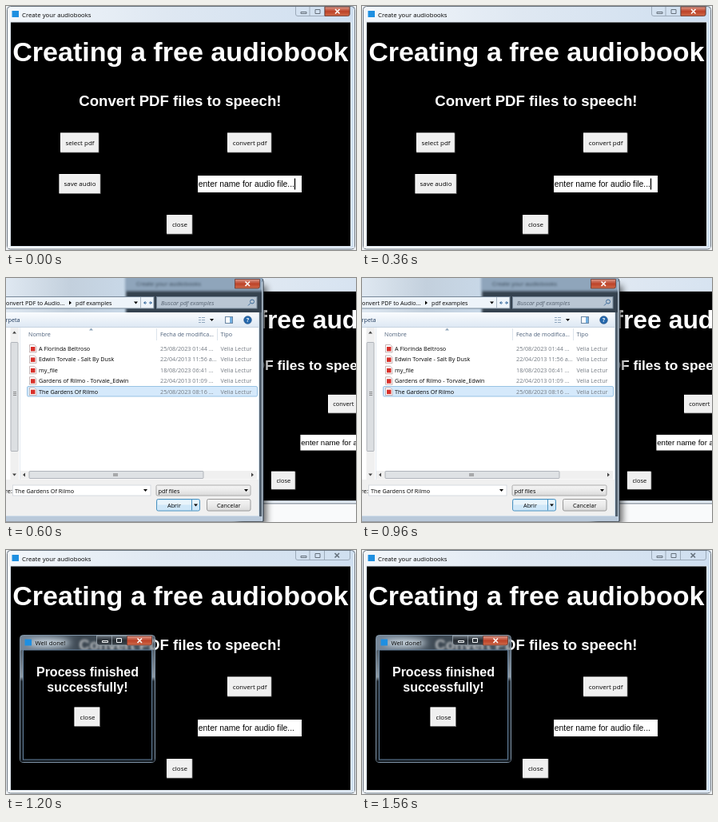
These frames come from a looping animation (438x305 px, 1800 ms). An HTML page:

```html
<!DOCTYPE html>
<html lang="en">
<head>
<meta charset="utf-8">
<title>Audiobook maker</title>
<style>
html, body { margin: 0; width: 100%; height: 100%; overflow: hidden; background: #fff; }
svg { display: block; width: 438px; height: 305px; }
text { white-space: pre; }
.ui { font: 7.75px "Open Sans", "Noto Sans", sans-serif; }
.btn { font: 8px "Open Sans", "Noto Sans", sans-serif; text-anchor: middle; }
.dlg { font: 7.25px "Open Sans", "Noto Sans", sans-serif; }
.big { font-family: "Liberation Sans", Arial, sans-serif; font-weight: 700; fill: #fff; }
.field { font: 10.35px "Liberation Sans", Arial, sans-serif; }
.mid { text-anchor: middle; }
.grey { fill: #747b83; }
.head { fill: #4c607a; }
.scene { animation: show 1800ms step-end infinite; }
.pick { animation-delay: -1200ms; }
.done { animation-delay: -600ms; }
@keyframes show {
  0% { visibility: visible; }
  33.3333%, 100% { visibility: hidden; }
}
</style>
</head>
<body>
<svg viewBox="0 0 438 305">
  <defs>
    <linearGradient id="bar">
      <stop offset="0" stop-color="#f3f7fb"/>
      <stop offset=".45" stop-color="#dfe8f2"/>
      <stop offset="1" stop-color="#cfdff0"/>
    </linearGradient>
    <linearGradient id="tool" x2="0" y2="1">
      <stop offset="0" stop-color="#fafcfe"/>
      <stop offset="1" stop-color="#dce7f3"/>
    </linearGradient>
    <linearGradient id="face" x2="0" y2="1">
      <stop offset="0" stop-color="#f4f4f4"/>
      <stop offset=".5" stop-color="#ebebeb"/>
      <stop offset="1" stop-color="#d9d9d9"/>
    </linearGradient>
    <linearGradient id="red" x2="0" y2="1">
      <stop offset="0" stop-color="#dc9a8c"/>
      <stop offset=".5" stop-color="#bd4329"/>
      <stop offset="1" stop-color="#cf6a49"/>
    </linearGradient>
    <linearGradient id="dark" x2="0" y2="1">
      <stop offset="0" stop-color="#6d7780"/>
      <stop offset=".5" stop-color="#272d33"/>
      <stop offset="1" stop-color="#3d454d"/>
    </linearGradient>
    <linearGradient id="smoke">
      <stop offset="0" stop-color="#77889a"/>
      <stop offset=".45" stop-color="#3b4650"/>
      <stop offset="1" stop-color="#4a5661"/>
    </linearGradient>
    <linearGradient id="edge" x2="0" y2="1">
      <stop offset="0" stop-color="#55616d"/>
      <stop offset=".24" stop-color="#8e9aa5"/>
      <stop offset=".28" stop-color="#20282f"/>
      <stop offset="1" stop-color="#141a20"/>
    </linearGradient>
    <linearGradient id="sheen">
      <stop offset="0" stop-color="#dfe8f1"/>
      <stop offset=".25" stop-color="#c3d0dd"/>
      <stop offset=".5" stop-color="#c9d9e9"/>
    </linearGradient>
    <filter id="soft" x="-30%" y="-60%" width="160%" height="220%"><feGaussianBlur stdDeviation="1.5"/></filter>
    <filter id="haze" x="-30%" y="-90%" width="160%" height="280%"><feGaussianBlur stdDeviation="4"/></filter>
    <clipPath id="popBar"><rect x="18" y="107" width="169" height="18"/></clipPath>
    <clipPath id="glass"><rect width="321" height="43"/></clipPath>
    <clipPath id="list"><rect x="18" y="62" width="298" height="178"/></clipPath>

    <text id="tagline" class="big" x="91.3" y="125.2" font-size="18.6">Convert PDF files to speech!</text>

    <path id="cross" d="M0 0l5.500 5.500m0-5.500l-5.500 5.500" fill="none" stroke-width="1.600"/>
    <g id="glyphs" fill="none">
      <path d="M7.500 7.500h7v2h-7z"/>
      <path d="M25.500 4.500h6v5h-6z"/>
      <use href="#cross" x="50" y="4"/>
    </g>
    <g id="hot">
      <path d="M.5 0h31v9q0 2.500-2.500 2.500h-28.500z" fill="url(#red)" stroke="#6b3a32" stroke-width=".8"/>
      <use href="#cross" x="13.500" y="3" stroke="#fff"/>
    </g>

    <g id="close">
      <rect width="32.5" height="24.5" fill="#696969"/>
      <rect width="31.5" height="23.5" fill="#fff"/>
      <rect x="1" y="1" width="30.5" height="22.5" fill="#f0f0f0"/>
      <text class="btn" x="16.5" y="15.2">close</text>
    </g>

    <g id="app">
      <rect x="1.5" y=".5" width="435" height="303.5" rx="4" fill="url(#bar)" stroke="#69747f"/>
      <path d="M2.5 4V302.5H435.5V4" fill="none" stroke="#f8fbfd" opacity=".8"/>
      <rect x="5" y="19.5" width="427" height="281.5" fill="#e3ebf3"/>
      <rect x="6" y="20.5" width="425" height="279.5"/>
      <rect x="7.5" y="6" width="8.5" height="8" fill="#1e8fe1"/>
      <text class="ui" x="20" y="13.5">Create your audiobooks</text>
      <path d="M362.5 1v9q0 2.500 2.500 2.500h63q2.500 0 2.500-2.500v-9M380 1v11.500M398.500 1v11.500" fill="none" stroke="#9caab9"/>
      <use href="#glyphs" x="361.500" stroke="#66717c"/>
      <text class="big mid" x="218.4" y="69.4" font-size="34.1">Creating a free audiobook</text>
      <use href="#tagline"/>
      <rect x="277" y="158.5" width="55.5" height="25" fill="#696969"/>
      <rect x="277" y="158.5" width="54.5" height="24" fill="#fff"/>
      <rect x="278" y="159.5" width="53.5" height="23" fill="#f0f0f0"/>
      <text class="btn" x="305" y="173.5">convert pdf</text>
      <rect x="240" y="212" width="130" height="21" fill="#fff"/>
      <text class="field" x="240.8" y="226">enter name for audio file...</text>
      <use href="#close" x="201" y="261"/>
    </g>

    <g id="side">
      <rect x="68" y="158.5" width="48.5" height="25" fill="#696969"/>
      <rect x="68" y="158.5" width="47.5" height="24" fill="#fff"/>
      <rect x="69" y="159.5" width="46.5" height="23" fill="#f0f0f0"/>
      <text class="btn" x="92.5" y="173.5">select pdf</text>
      <rect x="66.5" y="210" width="52" height="25" fill="#696969"/>
      <rect x="66.5" y="210" width="51" height="24" fill="#fff"/>
      <rect x="67.5" y="211" width="50" height="23" fill="#f0f0f0"/>
      <text class="btn" x="92.5" y="225">save audio</text>
    </g>

    <g id="doc">
      <path d="M.5.5h6l2.500 2.500v7h-8.500z" fill="#fff" stroke="#b9a3a3" stroke-width=".8"/>
      <rect x="2" y="3" width="5.5" height="5.5" fill="#d8302a"/>
    </g>
    <path id="down" d="M0 0h5l-2.500 3z"/>
  </defs>

  <rect width="438" height="305" fill="#f1f4f7"/>
  <path d="M225 .5h30" stroke="#555"/>

  <g class="scene">
    <use href="#app"/>
    <use href="#side"/>
    <use href="#hot" x="398.500" y="1"/>
    <path d="M361.500 215.500v14" stroke="#000" stroke-width="1.300"/>
  </g>

  <g class="scene pick">
    <rect width="438" height="305" fill="#f9fafb"/>
    <use href="#app" transform="translate(144 -2.300) scale(.935)"/>

    <!-- file dialog -->
    <rect x="290" y="10" width="36" height="300" opacity=".6" filter="url(#haze)"/>
    <path d="M-5 0H318q4 0 4 4V304H-5z" fill="#b9cbdd" stroke="#37434f"/>
    <g clip-path="url(#glass)">
      <rect width="322" height="43" fill="url(#sheen)"/>
      <g filter="url(#soft)">
        <rect x="149" y="-4" width="190" height="21" fill="#8fa5bb"/>
        <rect x="150" y="16" width="190" height="40" fill="#35424f"/>
        <text class="dlg" x="163" y="10" fill="#263645">Create your audiobooks</text>
      </g>
    </g>
    <path d="M317 43h4.500v260h-4.500z" fill="#53616f"/>
    <path d="M0 298h321v6h-321z" fill="#b9c9da"/>
    <path d="M316.500 43V297.500H0M320.500 5V303" fill="none" stroke="#d6e2ee" stroke-width=".8"/>
    <use href="#hot" x="286" y="1.500"/>

    <g class="dlg">
      <rect x="-2" y="23.5" width="187" height="14.5" fill="#eef4fa" stroke="#778899"/>
      <text x="0" y="33.5">onvert PDF to Audio...</text>
      <path d="M79 28.500l3 2.500l-3 2.500z"/>
      <text x="87" y="33.5">pdf examples</text>
      <path d="M168.500 24v14" stroke="#a8b5c2"/>
      <use href="#down" x="160" y="29.500"/>
      <path d="M173 31h3m-1.500-1.500l-2 1.500l2 1.500M182 31h-3m1.500-1.500l2 1.500l-2 1.500" fill="none" stroke="#245c94"/>
      <rect x="188.5" y="23.5" width="125.5" height="14.5" fill="#b9c6d3" stroke="#778899"/>
      <text x="194" y="33.5" font-style="italic" fill="#566371">Buscar pdf examples</text>
      <g fill="none" stroke="#3f6c9a"><circle cx="308" cy="29.500" r="2.500"/><path d="M306 31.500l-3 3"/></g>

      <rect y="43" width="316" height="19" fill="url(#tool)"/>
      <path d="M0 61.500h316" stroke="#c6d3e0"/>
      <text x="-.5" y="54.5" fill="#1e395b">rpeta</text>
      <path d="M241 49.500h3m1 0h4M241 52.500h3m1 0h4M241 55.500h3m1 0h4" stroke="#8fa6bd"/>
      <use href="#down" x="255" y="51"/>
      <rect x="274.5" y="48.5" width="9" height="8" fill="#fff" stroke="#6a86a3"/>
      <path d="M280 49h3v7h-3z" fill="#72aee0"/>
      <circle cx="302.500" cy="52.500" r="4.800" fill="#2468ad" stroke="#174579" stroke-width=".6"/>
      <text class="mid" x="302.5" y="55.3" fill="#fff" font-weight="700">?</text>

      <rect y="62" width="316" height="190" fill="#fff"/>
      <rect x="5.5" y="62" width="10.5" height="190" fill="#f0f0f0"/>
      <rect x="6" y="80.5" width="9" height="136" rx="1" fill="#dcdfe2" stroke="#a2a8af" stroke-width=".8"/>
      <path d="M9 142.500h4m-4 2h4m-4 2h4" stroke="#777" stroke-width=".8"/>
      <path d="M8 69.500h5l-2.500-3z" fill="#444"/>
      <use href="#down" x="8" y="244.500" fill="#444"/>
      <path d="M17.500 62v190" stroke="#e3eaf1"/>
      <path d="M188.500 63v15M264.500 63v15" stroke="#dce4ec"/>
      <path d="M104 65.500h5l-2.500-3z" fill="#8fa5ba"/>
      <g class="head">
        <text x="28" y="72.8">Nombre</text>
        <text x="193" y="72.8">Fecha de modifica...</text>
        <text x="268.5" y="72.8">Tipo</text>
      </g>
      <g clip-path="url(#list)">
        <rect x="26.5" y="135.5" width="288" height="12.5" rx="1.5" fill="#d5e9fb" stroke="#84b6df" stroke-width=".8"/>
        <g id="rows"></g>
      </g>
      <rect x="18" y="241" width="296" height="10.5" fill="#f0f0f0"/>
      <rect x="29" y="241.5" width="218" height="9" rx="1" fill="#dfe2e5" stroke="#a2a8af" stroke-width=".8"/>
      <path d="M135 244v4m2-4v4m2-4v4" stroke="#555" stroke-width=".8"/>
      <path d="M24 243.500v5l-3-2.500zM307 243.500v5l3-2.500z" fill="#444"/>

      <rect y="252" width="316" height="45" fill="#f0f0f0"/>
      <text x="-1" y="268.5">re:</text>
      <rect x="8.5" y="259" width="172.5" height="13" fill="#fff" stroke="#d3d8dd" stroke-width=".9"/>
      <text x="11" y="268.5">The Gardens Of Rilmo</text>
      <use href="#down" x="172" y="264"/>
      <rect x="188" y="259" width="118" height="13" rx="1.5" fill="url(#face)" stroke="#a3a3a3" stroke-width=".9"/>
      <text x="190.5" y="268.5">pdf files</text>
      <use href="#down" x="298" y="264"/>
      <rect x="188.5" y="276.5" width="54" height="14.5" rx="2" fill="#cfe7f8" stroke="#4b93c0"/>
      <rect x="190" y="278" width="51" height="5.5" fill="#e9f4fb"/>
      <path d="M232.500 277v13.500" stroke="#4b93c0"/>
      <text class="mid" x="210.5" y="286.5">Abrir</text>
      <use href="#down" x="235" y="282.500"/>
      <rect x="251.5" y="276.5" width="54.5" height="14.5" rx="2" fill="url(#face)" stroke="#999"/>
      <text class="mid" x="278.7" y="286.5">Cancelar</text>
    </g>
  </g>

  <g class="scene done">
    <use href="#app"/>

    <!-- finished popup -->
    <rect x="17.5" y="106.5" width="169" height="159" rx="4" fill="url(#smoke)" stroke="#7f93a6"/>
    <g clip-path="url(#popBar)">
      <use href="#tagline" filter="url(#soft)" opacity=".65"/>
      <ellipse cx="54" cy="116" rx="27" ry="5" fill="#dbe7f0" filter="url(#haze)"/>
    </g>
    <rect x="18" y="125" width="168" height="140" rx="2" fill="url(#edge)"/>
    <rect x="21.5" y="125" width="161" height="137" stroke="#6c8cab" stroke-width=".9"/>
    <rect x="23.5" y="111.5" width="8.5" height="8" fill="#1e8fe1"/>
    <text class="ui" x="36.5" y="119">Well done!</text>
    <path d="M113.500 107v9q0 3 3 3h63.500q3 0 3-3v-9z" fill="url(#dark)" stroke="#a0abb5" stroke-width=".8"/>
    <path d="M132.500 107v12" stroke="#a0abb5" stroke-width=".8"/>
    <use href="#glyphs" x="113" y="106" stroke="#f1f4f6"/>
    <use href="#hot" x="151" y="107.500"/>
    <g class="big mid" font-size="16">
      <text x="102" y="157.5">Process finished</text>
      <text x="102" y="177">successfully!</text>
    </g>
    <use href="#close" x="85.500" y="196.500"/>
  </g>
</svg>
<script>
const files = [
  ["A Florinda Beltroso", "25/08/2023 01:44 ..."],
  ["Edwin Torvale - Salt By Dusk", "22/04/2013 11:56 a..."],
  ["my_file", "18/08/2023 06:41 ..."],
  ["Gardens of Rilmo - Torvale_Edwin", "22/04/2013 01:09 ..."],
  ["The Gardens Of Rilmo", "25/08/2023 08:16 ..."]
];
document.getElementById("rows").innerHTML = files.map(([name, date], i) => {
  const y = 91 + i * 13.4;
  return `<use href="#doc" x="29" y="${y - 8}"/>
    <text x="41" y="${y}">${name}</text>
    <g class="grey"><text x="193" y="${y}">${date}</text><text x="268.5" y="${y}">Velia Lectur</text></g>`;
}).join("");
</script>
</body>
</html>
```
